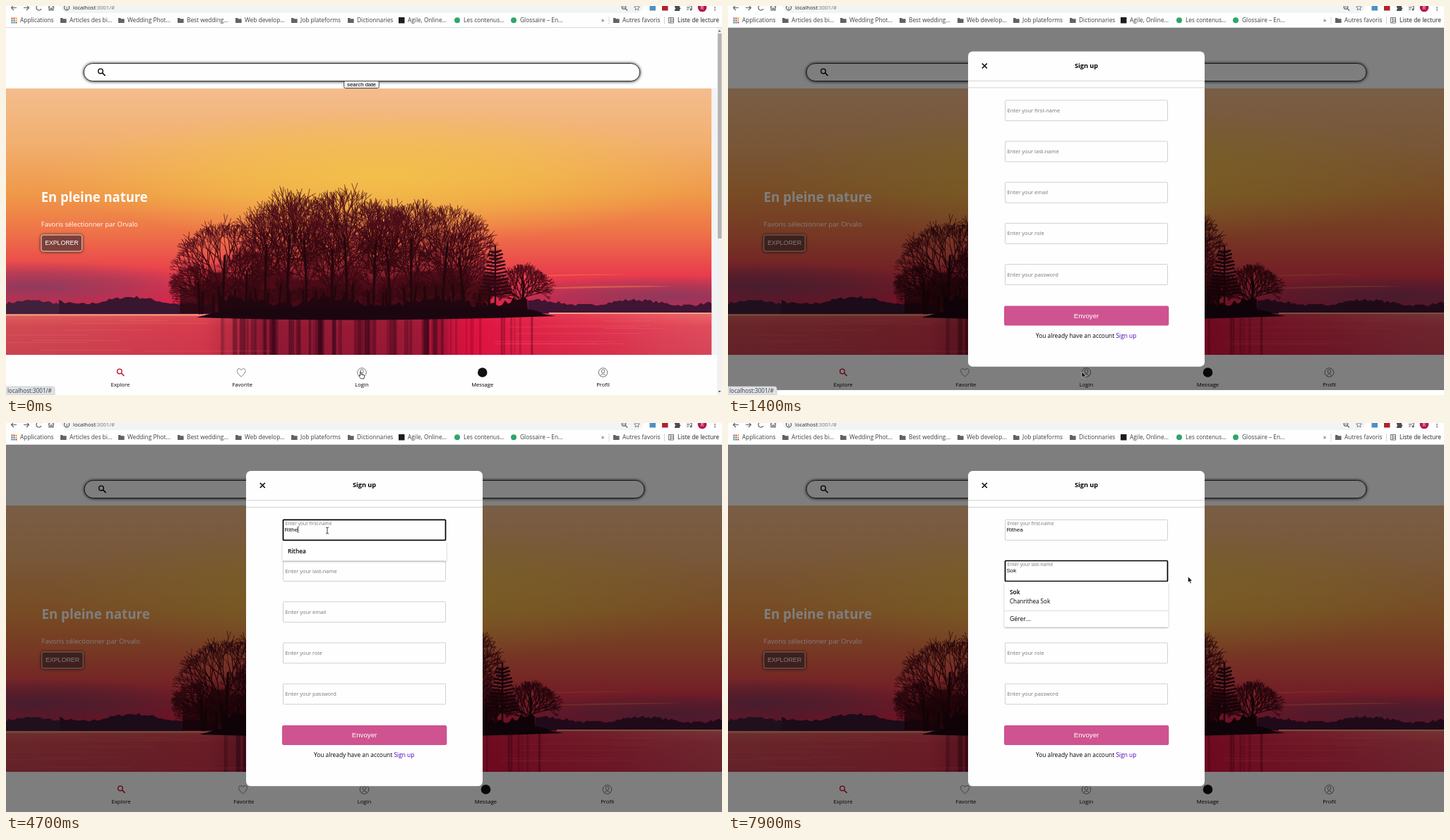
Write an HTML page that moves like this. It is 1014x552 px and loops after 8 s.

```html
<!DOCTYPE html>
<html lang="fr">
<head>
<meta charset="utf-8">
<title>Sign up</title>
<style>
  html, body { margin: 0; width: 100%; height: 100%; overflow: hidden; background: #fefefe; }
  svg { display: block; width: 100%; height: 100%; }
  text { font-family: "Open Sans", "Noto Sans", sans-serif; white-space: pre; }
  .arial { font-family: "Liberation Sans", Arial, sans-serif; }
  .mid { text-anchor: middle; }
  .line { fill: none; stroke: #5f6368; stroke-width: 1.2; }
</style>
</head>
<body>
<svg id="stage" viewBox="0 0 1014 552"></svg>
<script>
const W = 1014, TOP = 30.5, FULL = 521.5, LOOP = 8000;
const FIRST = 'Rithea', LAST = 'Sok';

let seed = 7;
const rnd = (a = 0, b = 1) => {
  seed = (seed * 16807) % 2147483647;
  return a + (b - a) * seed / 2147483647;
};
const n = v => v.toFixed(1);

// ---------- markup helpers ----------
const text = (x, y, s, size, more = '') => `<text x="${x}" y="${y}" font-size="${size}" ${more}>${s}</text>`;
const rect = (x, y, w, h, fill, more = '') => `<rect x="${x}" y="${y}" width="${w}" height="${h}" fill="${fill}" ${more}/>`;
const disc = (x, y, r, fill, more = '') => `<circle cx="${x}" cy="${y}" r="${r}" fill="${fill}" ${more}/>`;
const oval = (x, y, rx, ry, fill) => `<ellipse cx="${x}" cy="${y}" rx="${rx}" ry="${ry}" fill="${fill}"/>`;
const path = (d, more = '') => `<path d="${d}" ${more}/>`;
const stops = list => list.map(([o, c, a = 1]) => `<stop offset="${o}" stop-color="${c}" stop-opacity="${a}"/>`).join('');
const magnifier = (x, y, color) =>
  path(`M${x + 1} ${y + 1}L${x + 5} ${y + 5}`, `stroke="${color}" stroke-width="1.7"`) +
  disc(x - 1.6, y - 1.6, 3.3, 'none', `stroke="${color}" stroke-width="1.4"`);

// ---------- sunset picture ----------
const GROUND = 436;
const wood = { twig: [], limb: [], trunk: [] };

function branch(x, y, angle, len, depth) {
  const x2 = x + Math.sin(angle) * len, y2 = y - Math.cos(angle) * len;
  wood[depth > 3 ? 'limb' : 'twig'].push(`M${n(x)} ${n(y)}L${n(x2)} ${n(y2)}`);
  if (depth < 2) return;
  for (const side of [-1, 1])
    branch(x2, y2, angle * .95 + side * rnd(.08, .55), len * rnd(.7, .86), depth - 1);
}

// Limbs leave the trunk and reach for points on an oval crown.
function tree(x, h, r) {
  const lean = rnd(-.05, .05) * h;
  wood.trunk.push(`M${x} ${GROUND}Q${x} ${GROUND - h * .35} ${n(x + lean)} ${n(GROUND - h * .7)}`);
  for (let a = -2; a <= 2.01; a += .29) {
    const up = h * rnd(.18, .5);
    const dx = lean + r * Math.sin(a), dy = h * (.6 + .4 * Math.cos(a)) - up;
    branch(x + lean * up / h, GROUND - up, Math.atan2(dx, dy), Math.hypot(dx, dy) / 3.1, 6);
  }
}

function hills(from, to, base, height, color, rough = 2) {
  let d = `M${from} ${base}`;
  for (let x = from; x <= to; x += 4)
    d += `L${x} ${n(base - height * (.8 + .2 * Math.sin(x / 23)) - rnd(-rough, rough))}`;
  return path(d + `L${to} ${base}Z`, `fill="${color}"`);
}

function trees() {
  const grove = [[312, 116, 62], [278, 62, 32], [345, 84, 30], [372, 138, 28], [404, 157, 40], [432, 148, 28],
    [468, 128, 28], [490, 158, 44], [528, 146, 28], [552, 134, 26], [582, 150, 30], [628, 142, 50], [656, 112, 32], [742, 62, 30]];
  grove.forEach(t => tree(...t));
  for (let x = 280; x < 700; x += 16) tree(x + rnd(-6, 6), rnd(34, 60), 12);
  let pine = `M703 341V${GROUND}`;
  for (let y = 347; y < 412; y += 5) {
    const r = (y - 338) * .25 + 3;
    pine += `M${n(703 - r - rnd(0, 4))} ${y + 1}L703 ${y + 3}L${n(703 + r + rnd(0, 4))} ${y}`;
  }
  return hills(352, 690, GROUND, 122, 'url(#thicket)', 6) + hills(250, 372, GROUND, 80, 'url(#thicket)', 6) +
    `<g fill="none" stroke-linecap="round">` +
    path(wood.twig.join(''), 'stroke="#4a0c18" stroke-width=".7"') +
    path(wood.limb.join(''), 'stroke="#35080f" stroke-width="1.1"') +
    path(wood.trunk.join(''), 'stroke="#22060d" stroke-width="3"') +
    path(pine, 'stroke="#2c0712" stroke-width="2.4"') + '</g>' +
    hills(305, 750, GROUND + 2, 24, '#20060f', 5);
}

function water() {
  let s = rect(0, 437, W, 58, 'url(#water)') + rect(0, 437, W, 58, 'url(#deep)');
  for (let i = 0; i < 60; i++)
    s += rect(n(rnd(300, 640)), 440, n(rnd(2, 8)), 55, '#2c0416', `opacity="${n(rnd(.1, .45))}"`);
  for (let i = 0; i < 14; i++)
    s += rect(n(rnd(640, 760)), 440, n(rnd(1, 4)), 55, '#6a0524', 'opacity=".3"');
  for (let i = 0; i < 16; i++)
    s += rect(n(rnd(-50, 900)), n(rnd(444, 492)), n(rnd(60, 200)), .7, '#ff8a80', 'opacity=".25"');
  return s;
}

const picture = () => rect(0, 117, W, 378, 'url(#sky)') +
  oval(540, 240, 480, 95, 'url(#glow)') +
  oval(40, 398, 260, 36, 'url(#haze)') + oval(950, 412, 260, 30, 'url(#haze)') +
  path('M720 385Q800 379 900 381Q800 383 720 385M740 402Q850 395 960 398Q850 400 740 402', 'fill="#f2704c" opacity=".6"') +
  hills(0, 76, 438, 20, '#41203c') + hills(76, 300, 438, 25, '#381630') + hills(750, W, 436, 19, '#401433') +
  water() +
  rect(0, 437.5, 300, 2, '#f49a7c') + rect(780, 435, 234, 2, '#f6a088') +
  trees() +
  path('M274 442Q300 434 330 430L500 426L735 429Q765 431 772 437L790 440Q520 450 274 442Z', 'fill="#1b0610"');

// ---------- browser bar ----------
const folder = x => path(`M${x} 17h3l1 1.2h4.6v5.8h-8.6z`, 'fill="#5f6368"');

function browser() {
  const marks = [[90, 'Articles des bi…'], [172, 'Wedding Phot…'], [256, 'Best wedding…'], [338, 'Web develop…'],
    [417, 'Job plateforms'], [497, 'Dictionnaries'], [569, 'Agile, Online…'], [648, 'Les contenus…'], [728, 'Glossaire – En…'],
    [873, 'Autres favoris']];
  const label = (x, s, fill = '#3c4043') => text(x, 23, s, 8.35, `fill="${fill}"`);
  let s = rect(0, 0, W, 30, '#fefefe') + rect(0, 30, W, 1, '#d9dbde') +
    rect(77, -14, 826, 24, '#f1f3f4', 'rx="12"');
  s += path('M15 2.5H8M11 -1L7.5 2.5L11 6M25 2.5h7M29 -1L32.5 2.5L29 6M49.5 0A3.7 3.7 0 1 0 50 4M60 2L64 -2L68 2M61 1.5V6h2.2V3h1.8v3h2V1.5', 'class="line"');
  s += disc(86, 2.3, 3.6, 'none', 'class="line"') + rect(85.5, 1.5, 1.1, 3, '#5f6368') +
    text(95, 5, 'localhost<tspan fill="#777">:3001/#</tspan>', 7.6, 'fill="#222"');
  s += disc(875, 1.5, 2.8, 'none', 'class="line"') + path('M877 3.5L880 6.5M873.7 1.5h2.6', 'class="line"') +
    path('M893.5 -1.5l1.1 2.5 2.8.3-2.1 1.8.6 2.8-2.4-1.5-2.4 1.5.6-2.8-2.1-1.8 2.8-.3z', 'class="line" style="stroke-width:.8"') +
    rect(911.5, -2, 8.5, 8.5, '#4f8fc4') + rect(929, -2, 8.5, 8.5, '#b3202c') +
    path('M947 0h2.5a1.3 1.3 0 0 1 2.6 0H954v2.3a1.3 1.3 0 0 1 0 2.6V7h-7V4.6a1.2 1.2 0 0 0 0-2.4z', 'fill="#4a4d51"') +
    path('M964 0h7M964 2.5h4.5M964 5h3M971 0v5', 'class="line"') + disc(970, 5, 1.5, '#5f6368') +
    disc(986, 2, 6.3, '#b5174f') + text(986, 4.7, 'R', 7, 'fill="#fff" class="mid"') +
    disc(1004, -.5, .9, '#5f6368') + disc(1004, 2.5, .9, '#5f6368') + disc(1004, 5.5, .9, '#5f6368');
  const dots = ['#d93025', '#d93025', '#e8a000', '#1e8e3e', '#1a73e8', '#e8a000', '#1e8e3e', '#1a73e8', '#d93025'];
  dots.forEach((c, i) => s += rect(7.5 + i % 3 * 3, 16.5 + Math.floor(i / 3) * 3, 2, 2, c));
  s += label(20, 'Applications');
  marks.forEach(([x, t], i) => s += label(x, t) + (i < 6 || i > 8 ? folder(x - 13) : ''));
  s += rect(556, 16, 8.5, 8.5, '#1c1c1c') + disc(639, 20.3, 4, '#2fa66a') + disc(719, 20.3, 4, '#2fa66a');
  s += label(843, '»') + rect(853.5, 15, 1, 11, '#d5d7da') + rect(932, 15, 1, 11, '#d5d7da');
  s += path('M938.5 16.5h7v7.5h-7zM941 16.5v7.5M941 19h4.5M941 21.5h4.5', 'class="line" style="stroke-width:.9"') +
    label(951, 'Liste de lecture', '#202124');
  return s;
}

// ---------- page ----------
const person = x => `<g class="line" style="stroke:#666;stroke-width:.9">${disc(x, 520, 6.3, 'none')}${disc(x, 518.3, 2.4, 'none')}` +
  path(`M${x - 4} 524.7Q${x} 519.5 ${x + 4} 524.7`) + '</g>';

const nav = () => rect(0, 495, W + 8, 57, '#fefefe') + magnifier(163.5, 520, '#c2122d') +
  path('M335.5 526C327 519.5 329.3 514.6 332.3 514.6Q334.5 514.6 335.5 516.7Q336.5 514.6 338.7 514.6C341.7 514.6 344 519.5 335.5 526Z', 'class="line" style="stroke:#777;stroke-width:.9"') +
  person(507.5) + disc(679.5, 520, 6.8, '#111') + person(851.5) +
  [[163, 'Explore'], [337, 'Favorite'], [507.5, 'Login'], [679.5, 'Message'], [851.5, 'Profil']]
    .map(([x, s]) => text(x, 540, s, 7.7, 'class="mid" font-weight="500"')).join('');

const searchBar = () =>
  rect(111, 81.5, 793, 25, '#fefefe', 'rx="12.5" stroke="#333" filter="url(#shade)"') +
  magnifier(136.5, 94, '#000') +
  rect(482, 106.5, 50, 10, '#f4f4f4', 'rx="2" stroke="#333" stroke-width=".9"') +
  text(507, 114, 'search date', 7.9, 'class="mid arial"');

const hero = () => text(50.5, 278, 'En pleine nature', 18.7, 'fill="#fff" font-weight="700"') +
  text(50.5, 313, 'Favoris sélectionner par Orvalo', 9.6, 'fill="#fff"') +
  rect(50.7, 325, 58.5, 23, '#7c3f3b', 'rx="3" stroke="#f3dcd0" stroke-width=".9" filter="url(#shade)"') +
  text(80, 339.3, 'EXPLORER', 8.85, 'fill="#fff" class="mid arial"');

const scrollbar = () => rect(999.5, 117, 7.5, 378, '#f3f2f4') + rect(1007, 31, 7, 521, '#f1f1f1') +
  rect(1008, 39, 5.5, 291, '#b4b4b4') + path('M1008.5 36.5l2-2.5 2 2.5zM1008.5 546l2 2.5 2-2.5z', 'fill="#555"');

// ---------- sign-up dialog ----------
const names = ['first-name', 'last-name', 'email', 'role', 'password'];
const fieldTop = i => 137.3 + i * 58.2;
const field = (s, i) => rect(392.5, n(fieldTop(i)), 230, 29, '#fefefe', `id="box${i}" rx="1"`) +
  text(395.5, 0, `Enter your ${s}`, 7.5, `id="label${i}" fill="#757575"`) +
  text(394.5, n(fieldTop(i) + 16.8), '', 8.05, `id="input${i}" class="arial" fill="#111"`);

const list = (id, y, h, inner) => `<g id="${id}">${rect(391.5, y, 232, h, '#fff', 'rx="1.5" filter="url(#drop)"')}${inner}</g>`;

const dialog = () => rect(340, 68, 335, 447.3, '#fefefe', 'rx="6.5"') +
  path('M359.8 85l7 7M366.8 85l-7 7', 'stroke="#000" stroke-width="1.5"') +
  text(507.5, 91.3, 'Sign up', 9.15, 'class="mid" font-weight="700"') +
  rect(340, 109.3, 335, .9, '#cfcfcf') + rect(340, 119, 335, .9, '#cfcfcf') +
  names.map(field).join('') +
  rect(391, 429, 233.3, 28, '#cf5390', 'rx="2.5"') +
  text(507.5, 446.2, 'Envoyer', 9.7, 'class="mid arial" fill="#fff"') +
  text(436, 474.3, 'You already have an account', 8.37, 'fill="#000"') +
  text(549.5, 474.3, 'Sign up', 8.4, 'fill="#4a00b8" font-weight="500"') +
  list('list0', 167.5, 28, text(399, 184.5, FIRST, 8.3, 'font-weight="600"')) +
  list('list1', 225.5, 64, text(399, 243, LAST, 8.4, 'font-weight="600"') +
    text(399, 255.5, `Chan${FIRST.toLowerCase()} ${LAST}`, 8.05) + rect(391.5, 266.3, 232, .8, '#d4d4d4') +
    text(399, 281, 'Gérer…', 8.6)) +
  rect(0, 0, .8, 9, '#111', 'id="caret"');

const pointers = `<g id="pointer">
  <path id="arrow" d="M0 0V8.3L1.9 6.6L3.3 9.7L4.7 9.1L3.3 6.1H6Z" fill="#111" stroke="#fff" stroke-width=".5"/>
  <path id="beam" d="M-2-4.5Q0-4.5 0-3.5Q0-4.5 2-4.5M0-3.5V3.5M-2 4.5Q0 4.5 0 3.5Q0 4.5 2 4.5" fill="none" stroke="#222" stroke-width=".9"/>
  <path id="hand" d="M.5 .3Q1.3-.5 2 .3V3.8L6 4.8Q6.6 5 6.5 6L6 9.8H1.3L-1.3 6Q-1.2 4.8 .5 6Z" fill="#fff" stroke="#222" stroke-width=".8"/>
</g>`;

const ramp = (id, list) => `<linearGradient id="${id}" x2="0" y2="1">${stops(list)}</linearGradient>`;
const halo = (id, color, a) => `<radialGradient id="${id}">${stops([[0, color, a], [.5, color, a * .6], [1, color, 0]])}</radialGradient>`;
const shadow = (id, dy, blur, a) => `<filter id="${id}" x="-20%" y="-50%" width="140%" height="200%"><feDropShadow dx="0" dy="${dy}" stdDeviation="${blur}" flood-opacity="${a}"/></filter>`;

stage.innerHTML = `<defs>
  ${ramp('sky', [[0, '#f4bd8d'], [.2, '#f2b071'], [.4, '#ef9848'], [.55, '#ee7048'], [.7, '#e93c4d'], [.85, '#d81a48']])}
  ${ramp('water', [[0, '#ec7266'], [.3, '#dc4a55'], [1, '#cc4050']])}
  ${ramp('thicket', [[0, '#3a0812', 0], [.35, '#3a0812', .3], [.8, '#2a0610', .85]])}
  <linearGradient id="deep">${stops([[0, '#c04a50', .35], [.28, '#d02a44', .5], [.36, '#780a2a', .75], [.58, '#8a0a2c', .75], [.66, '#e0083c', .85], [.85, '#e21c48', .5], [1, '#e8506a', .3]])}</linearGradient>
  ${halo('glow', '#f3c548', .85)}${halo('haze', '#7c3c60', .8)}
  ${shadow('shade', .3, 2.3, .95)}${shadow('drop', 1, 1, .4)}
  <clipPath id="frame"><rect x="0" y="117" width="${W}" height="378"/></clipPath>
  <clipPath id="veilClip"><rect id="veilBox" x="0" y="${TOP}" width="${W}" height="0"/></clipPath>
  </defs>
  ${rect(0, 0, W, 552, '#fefefe')}
  <g id="photo"><g clip-path="url(#frame)">${picture()}</g>${hero()}</g>
  <g id="page">${searchBar()}${nav()}</g>
  <g id="bar">${scrollbar()}</g>
  <g id="veil" clip-path="url(#veilClip)">${rect(0, TOP, W, FULL, '#000', 'opacity=".5"')}<g id="modal">${dialog()}</g></g>
  ${browser()}
  <g id="status">${path('M0 540H66Q69 540 69 543V552H0Z', 'fill="#dfe1e5" stroke="#c4c7cc" stroke-width=".7"')}${text(2, 549, 'localhost:3001/#', 8.1, 'fill="#3c4043"')}</g>
  ${pointers}`;

// ---------- motion ----------
const el = id => document.getElementById(id);
const set = (id, attrs) => Object.entries(attrs).forEach(([k, v]) => el(id).setAttribute(k, v));
const show = (id, on) => el(id).style.display = on ? '' : 'none';
const clamp = v => Math.max(0, Math.min(1, v));

const FOCUS = [3100, 6000];
const KEYS = [[4100, 4300, 4400, 4600, 4700, 4900], [6500, 6600, 6900]];
const ROUTE = [[0, 501, 519], [1800, 501, 519], [1900, 506, 492], [2200, 488, 240], [2400, 488, 240], [2600, 458, 159],
  [2800, 458, 159], [2900, 455, 152.5], [5300, 455, 152.5], [5400, 449, 169], [5500, 449, 169],
  [5700, 430, 208], [7300, 430, 208], [7900, 651.5, 218], [8000, 651.5, 218]];

function pointerAt(t) {
  const i = ROUTE.findIndex(k => k[0] > t);
  const [a, b] = [ROUTE[i - 1], ROUTE[i]];
  const p = (t - a[0]) / (b[0] - a[0]);
  return [a[1] + (b[1] - a[1]) * p, a[2] + (b[2] - a[2]) * p];
}

function draw(now) {
  const t = Math.floor(now % LOOP / 100) * 100;
  const open = t >= 1100;

  set('photo', { transform: open ? '' : 'scale(.9857 1)' });
  set('page', { transform: open ? '' : 'scale(.993 1)' });
  show('bar', !open);

  // The veil grows downwards while the dialog stays centred in it.
  const height = open ? FULL * (1 - (1 - clamp((t - 1000) / 480)) ** 2.4) : 0;
  show('veil', open);
  set('veilBox', { height });
  set('modal', { transform: `translate(0 ${(height - FULL) / 2})` });
  set('status', { opacity: 1 - clamp((t - 1400) / 300) });

  const active = t >= FOCUS[1] ? 1 : t >= FOCUS[0] ? 0 : -1;
  names.forEach((_, i) => {
    const lift = i < 2 ? clamp((t - FOCUS[i]) / 200) : 0;
    set('label' + i, { y: fieldTop(i) + 17 - lift * 9.8, 'font-size': 7.5 - lift * .87 });
    set('box' + i, i === active ? { stroke: '#000', 'stroke-width': 1.7 } : { stroke: '#cbcbcb', 'stroke-width': .9 });
  });
  [FIRST, LAST].forEach((word, i) =>
    el('input' + i).textContent = word.slice(0, KEYS[i].filter(k => k <= t).length));

  show('list0', t >= 4300 && t < 5000);
  show('list1', t >= KEYS[1][0]);

  if (active >= 0) {
    const last = [FOCUS[active] + 100, ...KEYS[active].filter(k => k <= t)].pop();
    set('caret', { x: 394.3 + el('input' + active).getComputedTextLength(), y: fieldTop(active) + 9.7 });
    show('caret', t - last < 500);
  } else show('caret', false);

  const [x, y] = pointerAt(t);
  const hand = t < 1200;
  const beam = t >= 3200 && t < 5400 || t >= FOCUS[1] && x < 622;
  set('pointer', { transform: `translate(${x} ${y})` });
  show('hand', hand);
  show('beam', beam);
  show('arrow', !hand && !beam);
}

const start = performance.now();
(function tick() {
  draw(performance.now() - start);
  requestAnimationFrame(tick);
})();
</script>
</body>
</html>
```
